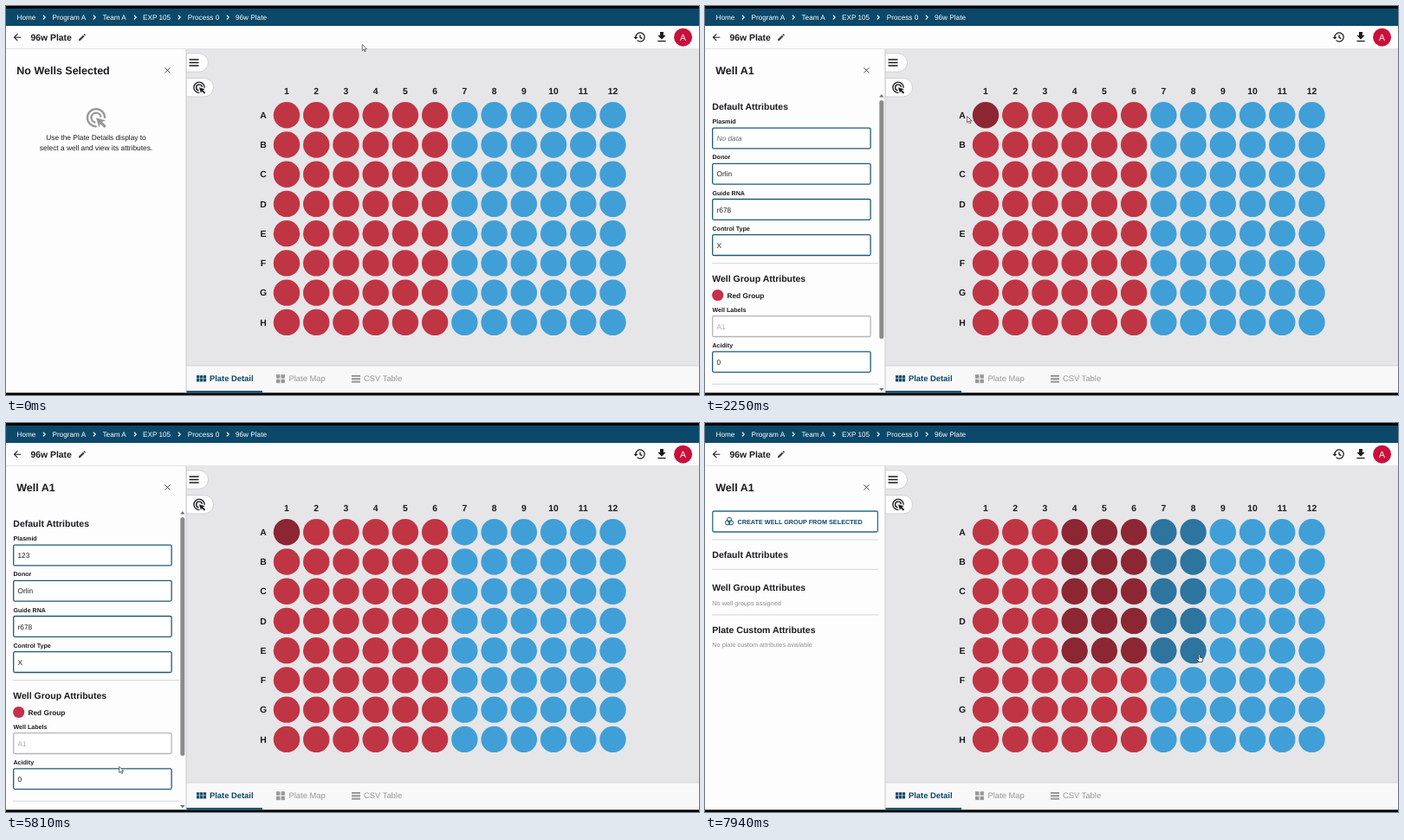
An HTML page that plays this animation: 800x450 px, repeating every 8 s.

```html
<!DOCTYPE html>
<html lang="en">
<head>
<meta charset="utf-8">
<title>Well plate editor</title>
<style>
  html, body { margin: 0; width: 100%; height: 100%; overflow: hidden; background: #000; }
  svg { display: block; width: 800px; height: 450px; }
  text { font-family: "Liberation Sans", Arial, sans-serif; white-space: pre; text-rendering: geometricPrecision; }
</style>
</head>
<body>
<svg id="stage" viewBox="0 0 800 450"></svg>
<script>
const LOOP = 8000;
const NAVY = '#0b4869', INK = '#1a1b1d', RED = '#c03544', BLUE = '#409fd6';
const DARK_RED = '#8c2633', DARK_BLUE = '#2d749f', BORDER = '#1f5a7a', BOTTOM = 447.4;
const stage = document.getElementById('stage');

// Markup helpers; text is placed by its vertical centre.
const text = (x, cy, s, size, { fill = INK, bold, italic, anchor = 'start', id } = {}) =>
  `<text ${id ? `id="${id}"` : ''} x="${x}" y="${cy + size * .36}" font-size="${size}" fill="${fill}" text-anchor="${anchor}"` +
  `${bold ? ' font-weight="700"' : ''}${italic ? ' font-style="italic"' : ''}>${s}</text>`;
const bold = (x, cy, s, size, fill = INK) => text(x, cy, s, size, { fill, bold: true });
const rect = (x, y, w, h, fill, extra = '') =>
  `<rect x="${x}" y="${y}" width="${w}" height="${h}" fill="${fill}" ${extra}/>`;
const circle = (x, y, r, fill, extra = '') => `<circle cx="${x}" cy="${y}" r="${r}" fill="${fill}" ${extra}/>`;
const path = (d, fill, extra = '') => `<path d="${d}" fill="${fill}" ${extra}/>`;
const line = (d, stroke, width = 1, extra = '') =>
  path(d, 'none', `stroke="${stroke}" stroke-width="${width}" ${extra}`);
const icon = (cx, cy, scale, body) =>
  `<g transform="translate(${cx} ${cy}) scale(${scale}) translate(-12 -12)">${body}</g>`;
const group = (id, body, extra = '') => `<g id="${id}" ${extra}>${body}</g>`;

const colX = c => 324 + 34.23 * c;
const rowY = r => 126.2 + 34.24 * r;
const range = n => [...Array(n).keys()];

const target = color =>
  line('M12.6 21A9 9 0 1 1 21 12.6M11.4 17A5 5 0 1 1 17 11.4', color, 2) +
  path('M12 12L22 15L18.2 16.3L22.5 20.5L20.5 22.5L16.3 18.2L15 22Z', color);

function header() {
  const crumbs = [[12.5, 'Home'], [53.5, 'Program A'], [111.5, 'Team A'],
    [158, 'EXP 105'], [209.8, 'Process 0'], [265, '96w Plate']];
  const chevrons = [44, 102, 149, 200, 256]
    .map(x => line(`M${x - 1.2} 10.7L${x + 1.2} 13.1L${x - 1.2} 15.5`, '#fff', 1.1)).join('');
  return rect(0, 2.8, 800, 20.2, NAVY) + rect(0, 23, 800, 26.5, '#fdfdfd') +
    crumbs.map(([x, s]) => text(x, 13.2, s, 8.2, { fill: '#fff' })).join('') + chevrons +
    icon(13, 36.2, .54, path('M20 11H7.83l5.59-5.59L12 4l-8 8 8 8 1.41-1.41L7.83 13H20z', INK)) +
    bold(28.5, 36.5, '96w Plate', 10.4) +
    icon(88, 36.2, .44, path('M3 17.25V21h3.75L17.81 9.94l-3.75-3.75zM20.7 7a1 1 0 0 0 0-1.4l-2.3-2.3a1 1 0 0 0-1.4 0l-1.9 1.8 3.8 3.8z', '#444')) +
    icon(731.5, 36, .64, path('M4 12H1l4 4 4-4H6', INK) +
      line('M5 12A8 8 0 1 1 7.4 17.7M12.8 8V12.6L16.6 14.9', INK, 2)) +
    icon(757, 36, .66, path('M5 20h14v-2H5zM19 9h-4V3H9v6H5l7 7z', INK)) +
    circle(781.6, 36.2, 10.5, '#c8103a') +
    text(781.6, 36.5, 'A', 10.5, { fill: '#fff', anchor: 'middle' });
}

function plate() {
  const pill = (y, w) => path(`M208 ${y}H${208 + w - 10.7}a10.7 10.7 0 0 1 0 21.4H208Z`, '#fdfdfd',
    'stroke="#c9c9cb" stroke-width=".8"');
  const label = (x, y, s) => text(x, y, s, 10.4, { bold: true, anchor: 'middle' });
  return rect(208, 49.5, 592, 367, '#e6e6e8') + line('M0 49.5H800', '#c9c9cb') +
    pill(54.8, 25.5) + line('M211.5 62H222.5M211.5 65.5H222.5M211.5 69H222.5', INK, 1.4) +
    pill(83.5, 31.5) + icon(223, 94.3, .68, target(INK)) +
    range(12).map(c => label(colX(c), 97.8, c + 1)).join('') +
    range(8).map(r => label(297, rowY(r), 'ABCDEFGH'[r])).join('') +
    range(96).map(i => circle(colX(i % 12), rowY(i / 12 | 0), 15.2, RED, 'class="well"')).join('');
}

function tabs() {
  const tiles = (x, y, cols, w, step, fill) => range(cols * 2)
    .map(i => rect(x + i % cols * step, y + (i / cols | 0) * step, w, w, fill)).join('');
  const grey = '#979797';
  return rect(208, 416, 592, BOTTOM - 416, '#f8f8f8') + line('M208 416H800', '#d2d2d4') +
    tiles(220, 427.3, 3, 3.3, 3.9, NAVY) + bold(235, 431, 'Plate Detail', 9.4, NAVY) +
    tiles(312, 426.3, 2, 4.4, 5.5, grey) + text(326.5, 431, 'Plate Map', 9.4, { fill: grey }) +
    line('M399 428H409M399 431.4H409M399 434.8H409', grey, 2.1) +
    text(413, 431, 'CSV Table', 9.4, { fill: grey }) + rect(208, BOTTOM - 2.2, 88, 2.2, NAVY);
}

function field(cy, label, value, { id = '', disabled } = {}) {
  return bold(8.5, cy - 19.3, label, 7.1) +
    rect(8.7, cy - 11.9, 182.4, 23.8, '#fff', `id="${id}Box" rx="1.5" stroke="${disabled ? '#b5b5b5' : BORDER}" stroke-width="1.3"`) +
    text(13.5, cy + .2, value, 8.3, { id: id + 'Value', fill: disabled ? '#aaa' : INK });
}

function panel() {
  const rule = y => line(`M8 ${y}H200`, '#d5d5d7');
  const grey = (y, s) => text(8.3, y, s, 7.3, { fill: '#8d8d8d' });
  const empty = icon(104, 129.2, 1.12, target('#979797')) +
    text(104, 152, 'Use the Plate Details display to', 8.35, { anchor: 'middle' }) +
    text(104, 164.3, 'select a well and view its attributes.', 8.35, { anchor: 'middle' });
  const form = bold(8.3, 116.5, 'Default Attributes', 10.5) +
    field(153, 'Plasmid', '', { id: 'plasmid' }) + line('M0 148.5V157.5', '#111', .8, 'id="caret"') +
    field(194.2, 'Donor', 'Orlin') + field(235.4, 'Guide RNA', 'r678') + field(276.6, 'Control Type', 'X') +
    rule(297.7) + bold(8.3, 315, 'Well Group Attributes', 10.5) +
    circle(14.7, 334.5, 6.6, '#c5304a') + bold(25.5, 334.7, 'Red Group', 8.3) +
    field(370.6, 'Well Labels', 'A1', { disabled: true }) + field(411.7, 'Acidity', '0') + rule(437.3);
  const scroll = path('M201 105.5L203.8 102L206.6 105.5Z', '#777') +
    rect(201.3, 109, 5, 276, '#8b8b8b', 'id="thumb" rx="2.5"') +
    path('M201 -1.7L203.8 1.8L206.6 -1.7Z', '#777', 'id="downArrow"');
  const save = rect(0, 415, 207, BOTTOM - 415, '#fdfdfd') + rect(12.7, 422.1, 182.8, 19.7, NAVY, 'rx="1.5"') +
    icon(72.6, 432, .6, line('M3.5 12.5L9 18L20.5 6.5', '#fff', 3.6)) +
    bold(82, 432.2, 'SAVE CHANGES', 7.15, '#fff');
  const multi = rect(8.8, 102, 190.6, 24, '#fff', 'rx="1.5" stroke="#2a6c85" stroke-width="1.3"') +
    [[28, 111.9], [26, 115.3], [30, 115.3]].map(([x, y]) => circle(x, y, 2.6, 'none', `stroke="${NAVY}" stroke-width=".9"`)).join('') +
    bold(37.5, 114, 'CREATE WELL GROUP FROM SELECTED', 7.25, NAVY) +
    rule(135) + bold(8.3, 152.5, 'Default Attributes', 10.5) +
    rule(169.3) + bold(8.3, 190.5, 'Well Group Attributes', 10.5) + grey(208, 'No well groups assigned') +
    rule(222) + bold(8.3, 239.5, 'Plate Custom Attributes', 10.5) + grey(256.6, 'No plate custom attributes available');
  return rect(0, 50, 208, BOTTOM - 50, '#fdfdfd') + line(`M208 50V${BOTTOM}`, '#c9c9cb') +
    text(12.3, 74, '', 12.5, { bold: true, id: 'title' }) +
    line('M183.4 71.4L189.4 77.4M189.4 71.4L183.4 77.4', '#333', .9) +
    group('empty', empty) + group('form', group('fields', form, 'clip-path="url(#formClip)"') + scroll + group('save', save)) +
    group('multi', multi);
}

function tooltip() {
  const head = (y, s) => bold(328, y, s, 6.25, '#555');
  const row = (y, k, v, opts) => bold(328, y, k + ':', 7.15) + text(379, y, v, 7.3, opts);
  const rule = y => line(`M328 ${y}H424`, '#dfdfdf', .8);
  return rect(322, 83.3, 107.6, 149.2, '#fcfcfc', 'rx="2" stroke="#c4c4c6" stroke-width=".7" filter="url(#shadow)"') +
    bold(328, 93.7, 'Well A1', 8.2) + rule(102.5) +
    head(111.3, 'Default Attributes') +
    row(123.3, 'Plasmid', 'No data', { fill: '#8f8f8f', italic: true }) + row(135.5, 'Donor', 'Orlin') +
    row(147.6, 'Guide RNA', 'r678') + row(159.7, 'Control Type', 'X') + rule(169.5) +
    head(178.5, 'Well Group Attributes') + row(190.3, 'Acidity', '0') +
    circle(393.8, 189, 2.2, '#cc2f4d') + text(398, 188.6, 'Red Group', 5.35, { fill: '#777' }) + rule(200.5) +
    head(209.7, 'Plate Attributes') + row(221.7, 'Drug', 'R');
}

const pointers = {
  arrow: path('M0 0V7.2L1.7 5.7L2.8 8.2L4 7.7L2.9 5.3H5.2Z', '#fff', 'stroke="#333" stroke-width=".7"'),
  hand: path('M-.8 .8Q0 -.5 .8 .8V3.6L3.6 4.3Q4.5 4.6 4.3 5.6L3.6 9H-.4L-2.7 5.8Q-2.6 4.7 -.8 5.8Z', '#fff', 'stroke="#222" stroke-width=".7"'),
  beam: line('M-1.6 -4H1.6M0 -4V4M-1.6 4H1.6', '#333', .8)
};

stage.innerHTML = `<defs><clipPath id="formClip"><rect id="clipBox" y="100" width="200"/></clipPath>
  <filter id="shadow"><feDropShadow dx="0" dy="1" stdDeviation="1.5" flood-opacity=".3"/></filter></defs>` +
  rect(0, 0, 800, 450, '#000') + plate() + tabs() + panel() + header() + group('tip', tooltip()) +
  group('pointer', Object.entries(pointers).map(([id, body]) => group(id, body)).join(''));

const $ = id => document.getElementById(id);
const wells = [...document.querySelectorAll('.well')];
const show = (id, on) => $(id).setAttribute('display', on ? 'inline' : 'none');
const set = (id, attrs) => { for (const k in attrs) $(id).setAttribute(k, attrs[k]); };

// Pointer stops: time, x, y
const route = [
  [0, 411.3, 44.5], [150, 411.3, 44.5], [850, 317, 126], [2180, 317, 126], [2650, 84.5, 152.5],
  [4250, 84.5, 152.5], [4630, 122, 404], [4900, 106, 430], [5250, 106, 430], [5600, 130.7, 397.3],
  [5920, 130.7, 397.3], [6700, 425.5, 122.8], [7120, 425.5, 122.8], [7800, 570.5, 267.5], [LOOP, 570.5, 267.5]
];
const CLICK = 1100, HINT = 1200, LEAVE = 2210, FOCUS = 2750, SAVED = 5200, DRAG = 6850;
const typed = [[3000, '1'], [3190, '12'], [3450, '123']];

function pointerAt(t) {
  const i = Math.max(1, route.findIndex(stop => stop[0] > t));
  const [t0, x0, y0] = route[i - 1], [t1, x1, y1] = route[i];
  const p = (t - t0) / (t1 - t0), e = p * p * (3 - 2 * p);
  return [x0 + (x1 - x0) * e, y0 + (y1 - y0) * e];
}

// Selected block: first column, last column, last row
function selection(t, x, y) {
  if (t < CLICK) return [-1, -1, -1];
  if (t < DRAG) return [0, 0, 0];
  return [3, Math.round((x - 324) / 34.23), Math.round((y + 3 - 126.2) / 34.24)];
}

function render(t) {
  const [x, y] = pointerAt(t);
  const [left, right, bottom] = selection(t, x, y);
  wells.forEach((well, i) => {
    const c = i % 12, r = i / 12 | 0, on = c >= left && c <= right && r <= bottom;
    well.setAttribute('fill', c < 6 ? (on ? DARK_RED : RED) : (on ? DARK_BLUE : BLUE));
  });

  const open = t >= CLICK, multi = t >= DRAG && (right > left || bottom > 0);
  $('title').textContent = open ? 'Well A1' : 'No Wells Selected';
  show('empty', !open);
  show('form', open && !multi);
  show('multi', multi);
  show('tip', t >= HINT && t < LEAVE);

  const entry = typed.filter(([at]) => t >= at).pop();
  const value = entry ? entry[1] : '';
  const editing = value && t < SAVED, focused = t >= FOCUS && t < SAVED;
  $('plasmidValue').textContent = value || 'No data';
  set('plasmidValue', { 'font-style': value ? 'normal' : 'italic', fill: value ? INK : '#666' });
  set('plasmidBox', { stroke: focused ? NAVY : BORDER, 'stroke-width': focused ? 1.6 : 1.3 });
  set('caret', { transform: `translate(${14 + value.length * 4.62} 0)` });
  show('caret', focused && (t - (entry ? entry[0] : FOCUS)) % 1060 < 530);
  show('save', editing);
  set('clipBox', { height: editing ? 315 : 347 });
  set('thumb', { height: editing ? 224 : 276 });
  set('downArrow', { transform: `translate(0 ${editing ? 410.3 : 443.8})` });

  const overWell = wells.some((_, i) => Math.hypot(x - colX(i % 12), y - rowY(i / 12 | 0)) < 15.2);
  const inField = x > 9 && x < 191 && Math.abs(y - 153) < 12;
  const kind = overWell ? 'hand' : inField ? 'beam' : 'arrow';
  for (const id in pointers) show(id, id === kind);
  set('pointer', { transform: `translate(${x} ${y})` });
}

const start = performance.now();
function tick() {
  render((performance.now() - start) % LOOP);
  requestAnimationFrame(tick);
}
tick();
</script>
</body>
</html>
```
